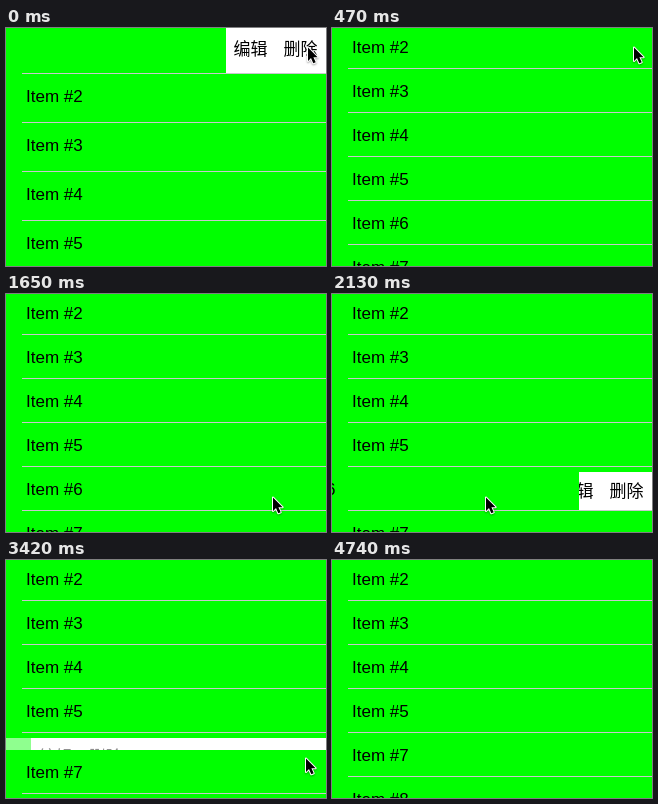
An HTML page with a canvas for the animation above (5.25 s loop, 320 px wide and 238 px high).

```html
<!DOCTYPE html>
<html lang="zh">
<head>
<meta charset="utf-8">
<style>
  html, body { margin: 0; width: 100%; height: 100%; overflow: hidden; background: #0f0; }
  canvas { display: block; }
</style>
</head>
<body>
<canvas width="320" height="238"></canvas>
<script>
const ctx = document.querySelector('canvas').getContext('2d');
const WIDTH = 320, HEIGHT = 238, LOOP = 5250, STEP = 117.5;
const GREEN = '#0f0', LINE = '#c8c7cc';
const ITEM_FONT = '17px "Liberation Sans", Arial, sans-serif';
const MENU_FONT = '17px "Noto Sans CJK SC", "Noto Sans CJK", sans-serif';
const ARROW = new Path2D('M1 1.5V15L4 12L6.3 17.3L8.7 16.3L6.4 11.2H10.6Z');

// Pointer moves; lift bows the path upwards.
const START = { x: 301, y: 18 };
const MOVES = [
  { from: 660, to: 1175, x: 257, y: 188, lift: 0 },
  { from: 1190, to: 1640, x: 266, y: 202, lift: -7 },
  { from: 1910, to: 2183, x: 132, y: 202, lift: 0 },
  { from: 2327, to: 2829, x: 299, y: 197, lift: 7.5 },
  { from: 4050, to: 4580, x: 306, y: 233, lift: 0 }
];

const progress = (t, from, to) => Math.min(1, Math.max(0, (t - from) / (to - from)));

function ease(t, from, to) {
  const u = progress(t, from, to);
  return u * u * (3 - 2 * u);
}

const removalAt = (t, start) => ease(t, start, start + 350);

function cursorAt(t) {
  let { x, y } = START;
  for (const move of MOVES) {
    const k = ease(t, move.from, move.to);
    x += (move.x - x) * k;
    y += (move.y - y) * k - move.lift * Math.sin(Math.PI * progress(t, move.from, move.to));
  }
  return { x, y };
}

function rect(color, x, y, w, h) {
  ctx.fillStyle = color;
  ctx.fillRect(x, y, w, h);
}

function write(text, font, x, y) {
  ctx.font = font;
  ctx.fillStyle = '#000';
  ctx.fillText(text, x, y);
}

const drawLine = y => rect(LINE, 16, y, WIDTH - 16, 1);

// Menu behind a swiped row; removal slides, fades and collapses it.
function drawMenu(top, fullHeight, baseline, swipe, removal) {
  if (!swipe || removal === 1) return;
  const shift = swipe + (WIDTH - swipe) * Math.min(1, removal * 1.46);
  const edge = Math.round(WIDTH - shift);
  const textX = Math.min(edge, WIDTH - 100) + 7.5;
  const height = Math.min(fullHeight, Math.round((fullHeight + 6) * (1 - removal) - 5));
  if (height <= 0) return;
  ctx.save();
  ctx.beginPath();
  ctx.rect(0, top, WIDTH, height);
  ctx.clip();
  if (removal) {
    rect('#fff', 0, top, WIDTH, height);
    ctx.globalAlpha = 1 - .92 * removal;
    rect(GREEN, 0, top, edge, height);
  }
  rect('#fff', edge, top, WIDTH - edge, height);
  ctx.beginPath();
  ctx.rect(edge, top, WIDTH - edge, height);
  ctx.clip();
  write('编辑', MENU_FONT, textX, baseline);
  write('删除', MENU_FONT, textX + 50, baseline);
  ctx.restore();
}

function drawCursor({ x, y }) {
  ctx.save();
  ctx.translate(Math.round(x), Math.round(y));
  ctx.shadowColor = 'rgba(0,0,0,.35)';
  ctx.shadowBlur = 2;
  ctx.shadowOffsetY = 1;
  ctx.lineWidth = 2;
  ctx.lineJoin = 'round';
  ctx.strokeStyle = '#fff';
  ctx.stroke(ARROW);
  ctx.shadowColor = 'transparent';
  ctx.fillStyle = '#000';
  ctx.fill(ARROW);
  ctx.restore();
}

function draw(t) {
  const first = removalAt(t, 118);
  const second = removalAt(t, 3207);
  const swipe = 100 * ease(t, 1907, 2222);
  const spacing = 49 - 5 * first;
  const rowTop = i => Math.round(45 - 49 * first + spacing * (i - 2) - (i > 6 ? 44 * second : 0));

  rect(GREEN, 0, 0, WIDTH, HEIGHT);
  if (!first) drawLine(45);
  for (let i = 2; i <= 8; i++) {
    if (i === 6 && second) continue;
    const top = rowTop(i);
    write('Item #' + i, ITEM_FONT, i === 6 ? 20 - swipe : 20, top + 29);
    drawLine(i === 6 ? top + Math.round(spacing) : rowTop(i + 1));
  }
  drawMenu(0, 45, 27, 100, first);
  drawMenu(178, 38, 203, swipe, second);
  if (t < 4650) drawCursor(cursorAt(t));
}

// The picture advances in even steps.
function frame() {
  const now = performance.now() % LOOP;
  draw(Math.floor(now / STEP) * STEP);
  requestAnimationFrame(frame);
}
frame();
</script>
</body>
</html>
```
